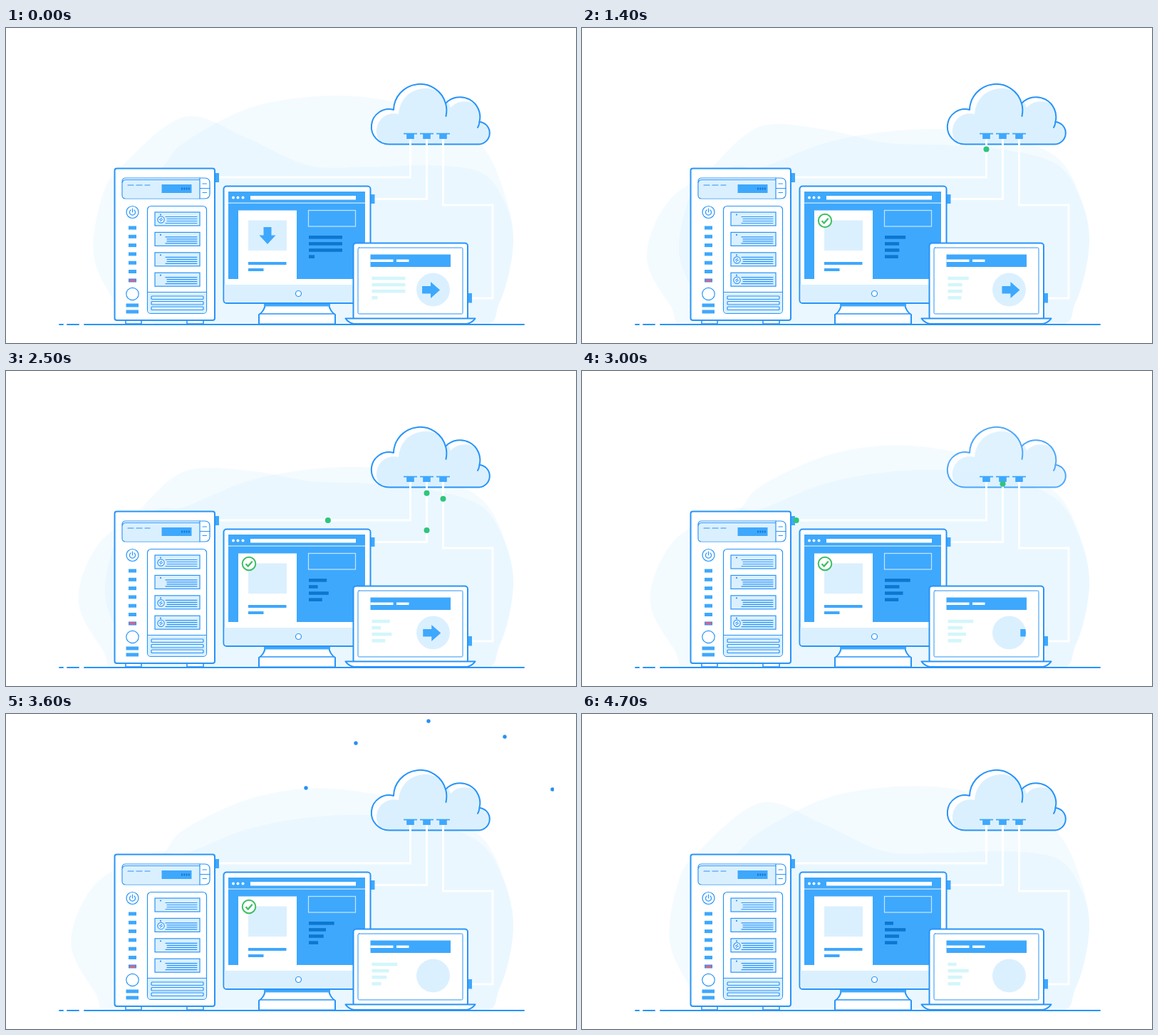
An HTML page that plays this animation: 800 px wide and 443 px high, repeating every 4800 ms.

```html
<!DOCTYPE html>
<html lang="en">
<head>
<meta charset="utf-8">
<title>Cloud sync</title>
<style>
html, body { margin: 0; width: 100%; height: 100%; overflow: hidden; background: #fff; }
svg { display: block; width: 100%; height: 100%; }
.line { fill: none; stroke: #2794fa; stroke-width: 1.2; stroke-linecap: round; stroke-linejoin: round; }
.body { fill: #fff; stroke: #2794fa; stroke-width: 2; stroke-linejoin: round; }
.thin { fill: #fff; stroke: #2794fa; stroke-width: 1.2; }
.pale { fill: #dbf0ff; }
.blue { fill: #3ea8fd; }
.white { fill: #fff; }
.cable { fill: none; stroke: #fff; stroke-width: 3; }
.blob { fill: #38b0ff; fill-opacity: .055; }
</style>
</head>
<body>
<svg viewBox="0 0 800 443" preserveAspectRatio="none">
  <defs>
    <path id="cloudShape" d="M538 163.5A24.7 24.7 0 1 1 543 115A37.2 37.2 0 0 1 616 106A28 28 0 0 1 663.5 132A15.8 15.8 0 0 1 663 163.5Z"/>
    <clipPath id="cloudClip"><use href="#cloudShape"/></clipPath>
    <clipPath id="groundClip"><rect width="800" height="416"/></clipPath>
    <clipPath id="burstClip"><rect width="769" height="443"/></clipPath>
    <clipPath id="tileClip"><rect x="340" y="270" width="54" height="43"/></clipPath>
    <clipPath id="discClip"><circle cx="599.5" cy="368" r="23.5"/></clipPath>
  </defs>

  <g clip-path="url(#groundClip)"><path id="blobA" class="blob"/><path id="blobB" class="blob"/></g>
  <g id="burst" fill="#2590f5" clip-path="url(#burstClip)"></g>

  <g id="cloud" transform="translate(1 0)">
    <use href="#cloudShape" class="white"/>
    <g clip-path="url(#cloudClip)"><use href="#cloudShape" class="pale" x="7" y="6"/></g>
    <use href="#cloudShape" class="line" style="stroke-width:2"/>
    <path class="line" style="stroke-width:2" d="M616 106Q618.5 114 616.5 124M663.5 132Q663 137 661 140"/>
  </g>

  <path id="cable1" class="cable" d="M567.5 156V210H298"/>
  <path id="cable2" class="cable" d="M517 240.5H590.5V156"/>
  <path id="cable3" class="cable" d="M654 380H683V249H613.5V156"/>
  <g id="ports" class="blue"></g>
  <path class="blue" d="M293 204h6v13h-6zM512 234h5.5v13H512zM648 373h6v13.5h-6z"/>
  <path class="line" style="stroke-width:2" d="M75 417H80M86 417H102M110 417H727"/>

  <g id="server">
    <path class="thin" style="stroke-width:1.6" d="M168 411H190V416H168ZM254 411H277V416H254Z"/>
    <rect class="body" x="152.5" y="197.5" width="140.5" height="213.5" rx="3"/>
    <path class="thin" d="M168 211H279Q286 211 286 218V233Q286 240 279 240H168Q163 240 163 235V216Q163 211 168 211Z"/>
    <path class="pale" d="M164 217Q164 214 168 214H272V239.4H168Q164 239 164 235Z"/>
    <path class="line" d="M163.5 217Q164 213.5 168 213.5H272M272 211V240M272 225.5H286M276 219H281.5M276 231.5H281.5M171 221H179M183 221H191M195 221H202"/>
    <rect class="blue" x="218.5" y="220" width="42" height="12"/>
    <path d="M246 226H258" stroke="#1878d6" stroke-width="3" stroke-dasharray="2 1.3"/>
    <circle class="thin" cx="177.5" cy="259" r="8.5"/>
    <path class="line" d="M175 256A4 4 0 1 0 180 256M177.5 254V259"/>
    <g id="leds" class="blue"></g>
    <rect x="172.5" y="353" width="10" height="4" fill="#e8607f" stroke="#2794fa"/>
    <circle class="thin" cx="177.5" cy="374" r="8.7"/>
    <path class="blue" d="M168.5 387.5h17.5v5h-17.5zM168.5 396.5h17.5v5h-17.5z"/>
    <rect class="thin" x="198.5" y="250.5" width="83" height="151" rx="5"/>
    <path class="pale" d="M199 372H281V397Q281 401 277 401H203Q199 401 199 397Z"/>
    <path class="line" d="M198.5 371.5H281.5"/>
    <g id="bays"></g>
  </g>

  <g id="monitor">
    <path class="body" d="M364 388H453Q454 398 462 403V416.5H355V403Q363 398 364 388Z"/>
    <path class="line" d="M357 402H460" style="stroke-width:1.6"/>
    <rect class="blue" x="362" y="387" width="93" height="4.5"/>
    <rect class="body" x="305.5" y="222.5" width="206" height="164.5" rx="4"/>
    <path class="pale" d="M306.5 361H510.5V383Q510.5 386 507.5 386H309.5Q306.5 386 306.5 383Z"/>
    <rect class="blue" x="312" y="230" width="192" height="123"/>
    <circle class="thin" cx="410.5" cy="373.5" r="4"/>
    <g class="white">
      <circle cx="319" cy="238.5" r="2"/><circle cx="325.5" cy="238.5" r="2"/><circle cx="332.5" cy="238.5" r="2"/>
      <path d="M343 236h148v5.5H343zM326 256.5h82V353h-82z"/>
      <path d="M312 245.5h192v1.2H312z" fill-opacity=".75"/>
    </g>
    <rect class="pale" x="340" y="270.5" width="54" height="42.5"/>
    <path class="blue" d="M340 329h53.5v4H340zM340 338h21.5v4H340z"/>
    <rect x="424.5" y="256.5" width="66" height="22.5" fill="none" stroke="#c5e6ff" stroke-width="1.2"/>
    <g id="monitorText" fill="#0d76cf"></g>
    <g clip-path="url(#tileClip)"><path id="downArrow" class="blue" d="M361.5 280H372.5V291.5H378.5L367 304L355.5 291.5H361.5Z"/></g>
    <g id="check"><circle r="9.3" fill="#fff" stroke="#3dbf65" stroke-width="2"/><path d="M-4.5 .2L-1.3 3.5L4.7 -3.3" fill="none" stroke="#3dbf65" stroke-width="2.3"/></g>
  </g>

  <g id="laptop">
    <rect class="body" x="487.5" y="302.5" width="160.5" height="108" rx="4"/>
    <rect class="line" x="494" y="309" width="147" height="93" rx="1.5" style="stroke-width:1"/>
    <rect class="blue" x="511.5" y="318.5" width="112.5" height="17.5"/>
    <path class="white" d="M511.5 325.5h32v3.5h-32zM548 325.5h17.5v3.5H548z"/>
    <circle class="pale" cx="599.5" cy="368" r="23.5"/>
    <g clip-path="url(#discClip)"><path id="rightArrow" class="blue" d="M584 363H596V357L609 368.5L596 380V373.5H584Z"/></g>
    <g id="laptopText" fill="#d3f6fa"></g>
    <path class="body" d="M476.5 408.5H658.5Q655 414 647 416H488Q480 414 476.5 408.5Z"/>
  </g>
  <g id="packets" fill="#2fc57c"></g>
</svg>

<script>
const LOOP = 4800;
const $ = id => document.getElementById(id);

function add(parent, tag, attrs = {}) {
  const el = document.createElementNS('http://www.w3.org/2000/svg', tag);
  for (const name in attrs) el.setAttribute(name, attrs[name]);
  return parent.appendChild(el);
}
const clamp = v => Math.max(0, Math.min(1, v));
const span = (t, from, to) => clamp((t - from) / (to - from));
const mix = (a, b, p) => a + (b - a) * p;
const easeOut = p => 1 - (1 - p) ** 3;
const hump = (t, from, to) => Math.sin(Math.PI * span(t, from, to)) ** 2;
const random = seed => Math.abs(Math.sin(seed * 127.1 + 3.7) * 43758.5453) % 1;
const show = (el, on) => el.setAttribute('visibility', on ? 'visible' : 'hidden');

// Two poses per blob: left edge, shoulder x, then evenly spaced top heights.
const BLOB_A = [[123, 162, 125, 154, 193, 195, 193], [165, 229, 167, 117, 94, 101, 128]];
const BLOB_B = [[160, 220, 161, 114, 97, 98, 120], [82, 208, 201, 169, 152, 148, 158]];

function smoothPath(points) {
  const n = points.length, at = i => points[(i + n) % n];
  let d = 'M' + points[0];
  for (let i = 0; i < n; i++) {
    const [a, b, c, e] = [at(i - 1), at(i), at(i + 1), at(i + 2)];
    d += `C${b[0] + (c[0] - a[0]) / 6},${b[1] + (c[1] - a[1]) / 6} ` +
         `${c[0] - (e[0] - b[0]) / 6},${c[1] - (e[1] - b[1]) / 6} ${c}`;
  }
  return d + 'Z';
}

function blobPath([poseA, poseB], p) {
  const [left, shoulder, ...tops] = poseA.map((v, i) => mix(v, poseB[i], p));
  const low = tops[4] - 125;
  return smoothPath([
    [400, 490], [left + 75, 435], [left + 33, 390], [left, 320],
    [mix(left, shoulder, .3), 238], [shoulder, 195],
    ...tops.map((y, i) => [250 + i * 87, y]),
    [665, 165 + low * .55], [697, 225 + low * .2], [712, 300], [693, 385], [650, 430]
  ]);
}

for (const x of [567.5, 590.5, 613.5])
  add($('ports'), 'path', { d: `M${x - 9.5} 147.8h19v1.8h-4.2v6.4h-10.600v-6.4h-4.2z` });
for (let i = 0; i < 6; i++)
  add($('leds'), 'rect', { x: 172, y: 278.5 + i * 12.3, width: 11, height: 5 });
for (let i = 0; i < 3; i++)
  add($('bays'), 'rect', { class: 'line', x: 204, y: 377 + i * 7.5, width: 73, height: 4.5, rx: 1 });

// Each disk blinks: on between two moments of its own period.
const disks = [
  { period: 800, on: 0, off: 200 },
  { period: 800, on: 200, off: 500 },
  { period: 2800, on: 1200, off: 2600 },
  { period: 1600, on: 500, off: 1450 }
];
disks.forEach((disk, i) => {
  const bay = add($('bays'), 'g', { transform: `translate(209 ${259 + i * 28.4})` });
  add(bay, 'rect', { class: 'thin', width: 63, height: 19, style: 'fill:#dbf0ff' });
  add(bay, 'circle', { cx: 8, cy: 3.5, r: 1.1, fill: '#2794fa' });
  add(bay, 'path', { class: 'line', d: 'M15 6.5H59M17 9.5H59M17 12.5H59M15 15.5H59' });
  disk.icon = add(bay, 'g');
  add(disk.icon, 'circle', { class: 'thin', cx: 8.5, cy: 10.5, r: 4.6 });
  add(disk.icon, 'path', { class: 'line', d: 'M6.5 10.5L9.5 8.5M7.5 12.5L10.5 10.5' });
});

const textRows = (id, x, y) => [0, 1, 2, 3].map(i =>
  add($(id), 'rect', { x, y: y + i * 9.1, height: 4.6 }));
const texts = [textRows('monitorText', 425, 292), textRows('laptopText', 513.5, 349.7)];

// A full paragraph collapses, then its lines keep changing length.
function lineWidth(i, t) {
  const step = Math.floor(t / 600);
  const length = k => 10 + 26 * random(i * 17 + k);
  const jitter = mix(length(step), length(step + 1), t / 600 - step);
  return mix(i < 3 ? 47 : 8, jitter, span(t, 0, 300));
}

const packets = [
  { cable: $('cable1'), duration: 1070, starts: [1353, 1940] },
  { cable: $('cable2'), duration: 450, starts: [1668, 2096, 2245, 2559] },
  { cable: $('cable3'), duration: 690, starts: [700, 1440, 1862] }
].flatMap(({ cable, duration, starts }) => starts.map(start =>
  ({ cable, duration, start, dot: add($('packets'), 'circle', { r: 4 }) })));

const sparks = [[421, 104], [491, 41], [593, 10], [700, 32], [767, 106]].map(([x, y]) =>
  ({ x, y, dot: add($('burst'), 'circle') }));

// Moments at which the laptop arrow is centred: it enters fast and leaves slowly.
const ARROW_CENTRES = [0, 1310, 2480];
function arrowOffset(t) {
  const dt = t - ARROW_CENTRES.filter(c => c - 350 <= t).pop();
  return dt * (dt < 0 ? .15 : .06);
}

function draw(t) {
  const phase = Math.PI * t / LOOP;
  $('blobA').setAttribute('d', blobPath(BLOB_A, .6 * hump(t, 0, 1900) + hump(t, 1900, 4700)));
  $('blobB').setAttribute('d', blobPath(BLOB_B, Math.sin(phase) + .25 * Math.sin(3 * phase)));

  for (const rows of texts) rows.forEach((row, i) => row.setAttribute('width', lineWidth(i, t)));
  for (const { icon, period, on, off } of disks) show(icon, t % period >= on && t % period < off);

  const drop = t < 1245 ? ((t + 415) % 830 / 830 - .5) * 86 : 60;
  $('downArrow').setAttribute('transform', `translate(0 ${drop})`);
  $('rightArrow').setAttribute('transform', `translate(${arrowOffset(t)} 0)`);
  const pop = easeOut(span(t, 1250, 1450)) * (1 - span(t, 4000, 4200));
  $('check').setAttribute('transform', `translate(341 271) scale(${pop})`);

  for (const { cable, duration, start, dot } of packets) {
    const p = (t - start) / duration;
    const { x, y } = cable.getPointAtLength(clamp(p) * cable.getTotalLength());
    dot.setAttribute('cx', x);
    dot.setAttribute('cy', y);
    show(dot, p >= 0 && p <= 1);
  }

  $('cloud').setAttribute('opacity', 1 - .25 * hump(t, 2850, 3300));

  const out = easeOut(span(t, 3100, 3550));
  const size = t < 3100 ? 0 : 2.7 * (1 - span(t, 4200, 4400));
  for (const { x, y, dot } of sparks) {
    dot.setAttribute('cx', mix(594, x, out));
    dot.setAttribute('cy', mix(118, y, out));
    dot.setAttribute('r', size);
  }
}

const begin = performance.now();
function tick() {
  draw((performance.now() - begin) % LOOP);
  requestAnimationFrame(tick);
}
tick();
</script>
</body>
</html>
```
